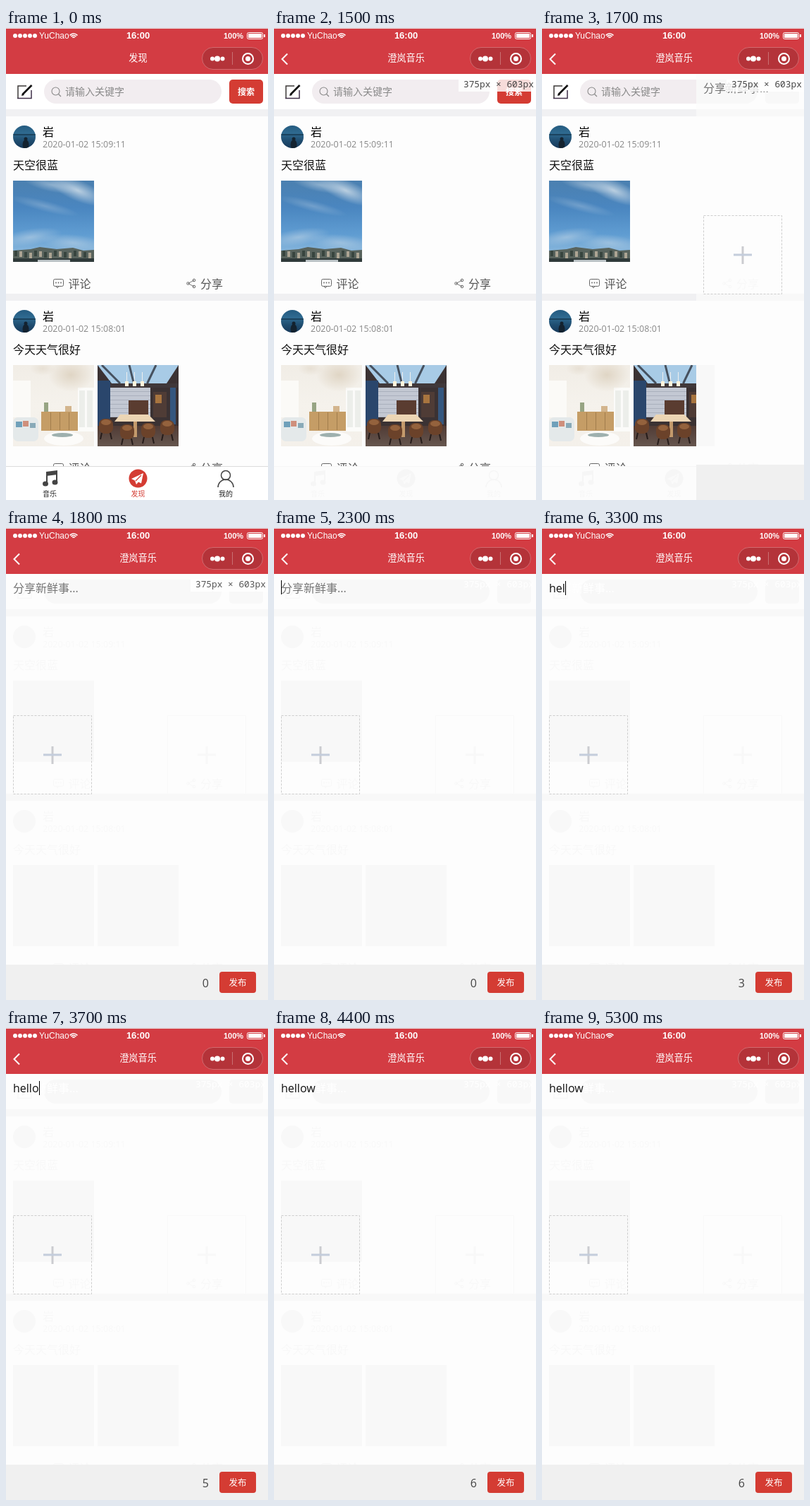
An HTML page with a canvas for the animation above (8000 ms loop, 372x668 px).

```html
<!DOCTYPE html>
<html lang="zh-CN">
<head>
<meta charset="utf-8">
<title>发现</title>
<style>
  html, body { margin: 0; width: 100%; height: 100%; overflow: hidden; background: #fdfdfd; }
  canvas { display: block; width: 372px; height: 668px; }
</style>
</head>
<body>
<canvas id="stage"></canvas>
<script>
const W = 372, H = 668, LOOP = 8000;
const RED = '#d43c33', BAR = '#d33c43', PAPER = '#fdfdfd';
const SANS = '"Open Sans", "Noto Sans CJK SC", "Noto Sans CJK", sans-serif';
const CJK = '"Noto Sans CJK SC", "Noto Sans CJK", sans-serif';
const ARIAL = '"Liberation Sans", Arial, sans-serif';
const MONO = '"Noto Sans Mono", "DejaVu Sans Mono", monospace';
const HINT = '分享新鲜事...';
const WORD = 'hellow';
const KEYS = [3000, 3100, 3300, 3500, 3700, 3900];
const CARET = [[2200, 2700], [3000, 4400], [4900, 5300]];

const canvas = document.getElementById('stage');
const ctx = canvas.getContext('2d');
const dpr = window.devicePixelRatio || 1;
canvas.width = W * dpr;
canvas.height = H * dpr;

// When set, everything is painted in this single faint tone.
let ghost = null;
const ink = c => ghost || c;

function rect(x, y, w, h, c) {
  ctx.fillStyle = ink(c);
  ctx.fillRect(x, y, w, h);
}

function round(x, y, w, h, r, c, stroke) {
  ctx.beginPath();
  ctx.roundRect(x, y, w, h, r);
  if (c) { ctx.fillStyle = ink(c); ctx.fill(); }
  if (stroke) { ctx.strokeStyle = ink(stroke); ctx.stroke(); }
}

function oval(x, y, rx, ry, c) {
  ctx.beginPath();
  ctx.ellipse(x, y, rx, ry, 0, 0, 7);
  ctx.fillStyle = ink(c);
  ctx.fill();
}
const dot = (x, y, r, c) => oval(x, y, r, r, c);

function ring(x, y, r, c, w) {
  ctx.beginPath();
  ctx.arc(x, y, r, 0, 7);
  ctx.strokeStyle = ink(c);
  ctx.lineWidth = w;
  ctx.stroke();
}

function line(pts, c, w) {
  ctx.beginPath();
  pts.forEach(([x, y]) => ctx.lineTo(x, y));
  ctx.strokeStyle = ink(c);
  ctx.lineWidth = w;
  ctx.stroke();
}

function poly(pts, c) {
  ctx.beginPath();
  pts.forEach(([x, y]) => ctx.lineTo(x, y));
  ctx.fillStyle = ink(c);
  ctx.fill();
}

// y is the optical centre of the line.
function text(s, x, y, size, c, align = 'left', family = SANS, weight = 400) {
  ctx.font = `${weight} ${size}px ${family}`;
  ctx.textAlign = align;
  ctx.fillStyle = ink(c);
  ctx.fillText(s, x, Math.round(y + size * 0.37));
}

function fade(y0, y1, ...stops) {
  const g = ctx.createLinearGradient(0, y0, 0, y1);
  stops.forEach((c, i) => g.addColorStop(i / (stops.length - 1), c));
  return g;
}

// Soft-edged elliptical haze.
function haze(x, y, rx, ry, rgb, alpha, turn = 0) {
  const g = ctx.createRadialGradient(0, 0, 0, 0, 0, 1);
  g.addColorStop(0, `rgba(${rgb},${alpha})`);
  g.addColorStop(1, `rgba(${rgb},0)`);
  ctx.save();
  ctx.translate(x, y);
  ctx.rotate(turn);
  ctx.scale(rx, ry);
  dot(0, 0, 1, g);
  ctx.restore();
}

function inside(x, y, w, h, draw) {
  ctx.save();
  ctx.beginPath();
  ctx.rect(x, y, w, h);
  ctx.clip();
  draw();
  ctx.restore();
}

function header(title, back) {
  rect(0, 0, W, 65, BAR);
  rect(0, 0, W, 1, '#e6dcdd');
  for (let i = 0; i < 5; i++) dot(13 + i * 7, 11, 3, '#fff');
  text('YuChao', 47, 10.5, 12, '#fff', 'left', ARIAL);
  for (const r of [2, 4.5, 7]) {
    ctx.beginPath();
    ctx.arc(96, 15, r, -Math.PI * 0.78, -Math.PI * 0.22);
    ctx.strokeStyle = '#fff';
    ctx.lineWidth = 1.6;
    ctx.stroke();
  }
  text('16:00', 187.5, 10.5, 13, '#fff', 'center', ARIAL, 700);
  text('100%', 309, 11, 11, '#fff', 'left', ARIAL, 700);
  ctx.lineWidth = 1;
  round(342.5, 6.5, 22, 9, 2, null, '#fff');
  rect(344, 8, 19, 6, '#fff');
  rect(366, 9, 2, 4, '#fff');

  text(title, 187.5, 42, 13.2, '#fff', 'center', CJK, 500);
  if (back) line([[19, 36.5], [11.5, 44], [19, 51.5]], '#fff', 2);

  ctx.lineWidth = 1;
  round(278.5, 27.5, 86, 31, 15.5, 'rgba(0,0,0,.15)', 'rgba(255,255,255,.25)');
  dot(293, 43.5, 3, '#fff');
  dot(300, 43.5, 4, '#fff');
  dot(307.5, 43.5, 3, '#fff');
  rect(321, 34, 1, 18, 'rgba(255,255,255,.3)');
  ring(343.5, 43.5, 7.5, '#fff', 2);
  dot(343.5, 43.5, 3.5, '#fff');
}

function searchBar() {
  if (!ghost) rect(0, 65, W, 50, '#fff');
  line([[29, 82], [17, 82], [17, 100]], '#3c3a38', 1.5);
  line([[16, 99.5], [36, 99.5], [36, 88]], '#40304a', 1.5);
  line([[24, 93.5], [36.5, 81]], '#111', 2.6);
  poly([[22, 96], [23, 92], [26, 95]], '#111');
  round(54, 73, 252, 34, 17, '#f2edf0');
  ring(70.5, 89.5, 5.5, '#8a8a8a', 1.1);
  line([[74.5, 93.5], [78, 97]], '#8a8a8a', 1.2);
  text('请输入关键字', 84, 90, 14, '#8a8a8a');
  round(317, 73, 48, 34, 5, RED);
  text('搜索', 341, 91, 12, '#fff', 'center', CJK, 700);
}

function skyPhoto() {
  rect(0, 0, 115, 115, fade(0, 115, '#4b80b0', '#4a86c0', '#609dd2', '#9fc5e2'));
  const mist = '205,220,232';
  haze(92, 14, 44, 15, mist, 0.85, 0.4);
  haze(55, 6, 40, 10, mist, 0.5, 0.2);
  haze(45, 36, 50, 8, mist, 0.3, 0.25);
  haze(25, 80, 45, 12, mist, 0.5, -0.15);
  haze(85, 88, 45, 12, mist, 0.45, 0.1);
  poly([[0, 99], [25, 97], [38, 94], [62, 97], [85, 95], [100, 99], [115, 98], [115, 115], [0, 115]], '#58635d');
  for (let i = 0; i < 16; i++) rect(2 + i * 7, 99 + i * 5 % 4, 4, 8, i % 2 ? '#aca493' : '#37443e');
  rect(0, 110, 115, 5, '#2f3a3a');
  rect(35, 112, 46, 3, '#b9c1c4');
}

function loungePhoto() {
  rect(0, 0, 115, 115, fade(0, 115, '#f1ede6', '#f5f2ec', '#f4f0ea'));
  rect(0, 22, 25, 52, '#fbfaf7');
  rect(92, 32, 23, 62, '#fbfbf9');
  rect(94, 36, 8, 52, '#eceeea');
  rect(105, 36, 8, 52, '#eceeea');
  haze(82, 14, 32, 24, '219,207,188', 0.8);
  haze(42, 5, 18, 10, '225,215,200', 0.6);
  rect(40, 66, 52, 27, '#c59d66');
  for (let x = 53; x < 92; x += 13) rect(x, 67, 1, 25, '#a17d4c');
  rect(44, 53, 6, 13, '#97a483');
  rect(74, 58, 9, 8, '#d3b58d');
  round(0, 74, 36, 34, 7, '#e4e9ea');
  rect(4, 80, 9, 8, '#6fa0ba');
  rect(14, 79, 8, 8, '#cf8f7c');
  rect(24, 82, 8, 7, '#89aab8');
  oval(72, 104, 28, 10, '#fcfbf9');
  oval(70, 99, 15, 3, '#9eb0ae');
}

function diningPhoto() {
  rect(0, 0, 115, 115, '#3b3233');
  poly([[0, 0], [115, 0], [98, 26], [20, 26]], '#a8cbe6');
  for (const x of [6, 45, 83]) line([[x, 0], [x / 2 + 29, 26]], '#46515f', 3);
  rect(0, 26, 115, 6, '#40383a');
  rect(0, 22, 18, 93, '#2a466c');
  rect(18, 32, 57, 42, '#c3c8d3');
  for (let y = 37; y < 74; y += 6) rect(18, y, 57, 1, '#aab0bd');
  rect(44, 50, 28, 22, '#5a3c30');
  rect(79, 38, 19, 36, '#4f3c36');
  rect(82, 42, 9, 12, '#a8753f');
  rect(103, 32, 8, 52, '#35577f');
  for (const x of [41, 52, 63]) {
    rect(x, 10, 1, 14, '#eee');
    rect(x - 2, 23, 5, 7, '#fff4dc');
  }
  rect(0, 86, 115, 29, fade(86, 115, '#503b35', '#66564e'));
  poly([[32, 70], [72, 70], [82, 80], [24, 80]], '#ecd5b4');
  rect(51, 80, 5, 22, '#c39a6c');
  for (const [x, y] of [[12, 76], [42, 84], [72, 82], [99, 78]]) {
    round(x - 10, y, 20, 21, 8, '#6b422a');
    oval(x, y + 5, 7, 4, '#94623d');
    line([[x - 6, y + 20], [x - 8, y + 29]], '#261c1a', 2);
    line([[x + 6, y + 20], [x + 8, y + 29]], '#261c1a', 2);
  }
}

function photo(x, y, paint) {
  if (ghost) return rect(x, y, 115, 115);
  inside(x, y, 115, 115, () => {
    ctx.translate(x, y);
    paint();
  });
}

function avatar(x, y) {
  if (ghost) return dot(x, y, 16);
  ctx.save();
  ctx.beginPath();
  ctx.arc(x, y, 16, 0, 7);
  ctx.clip();
  rect(x - 16, y - 16, 32, 32, fade(y - 16, y + 16, '#245b80', '#2f6a90', '#1f4d70', '#17395a'));
  rect(x - 16, y - 4, 32, 2, '#1b435e');
  dot(x + 2, y + 3, 2.5, '#13222f');
  oval(x + 2, y + 11, 4.5, 7, '#13222f');
  ctx.restore();
}

function post(y, date, words, photos) {
  avatar(26, y + 29);
  text('岩', 52, y + 22, 16, '#000');
  text(date, 52, y + 39.5, 12.5, '#888');
  text(words, 10, y + 69, 16, '#111');
  photos.forEach((p, i) => photo(10 + i * 120, y + 91, p));

  ctx.lineWidth = 1;
  round(67.5, y + 230.5, 14, 10, 2, null, '#666');
  line([[71, y + 240.5], [73, y + 243], [75, y + 240.5]], '#666', 1);
  for (const x of [71, 74.5, 78]) dot(x, y + 235.5, 0.9, '#666');
  text('评论', 88.5, y + 237, 16, '#555');

  line([[267, y + 232], [258.5, y + 236.5], [267, y + 241]], '#666', 0.9);
  ring(267, y + 232, 1.8, '#666', 1);
  ring(258.5, y + 236.5, 1.8, '#666', 1);
  ring(267, y + 241, 1.8, '#666', 1);
  text('分享', 276, y + 237, 16, '#555');
}

function feed() {
  searchBar();
  rect(0, 115, W, 10, '#f1f1f3');
  post(125, '2020-01-02 15:09:11', '天空很蓝', [skyPhoto]);
  rect(0, 376, W, 10, '#f0f0f2');
  post(386, '2020-01-02 15:08:01', '今天天气很好', [loungePhoto, diningPhoto]);
}

function tabs() {
  ctx.fillStyle = ghost ? '#fcfcfc' : '#fff';
  ctx.fillRect(0, 620, W, 48);
  rect(0, 620, W, 1, '#dcdcdc');

  const dark = '#444';
  poly([[57, 628], [73, 626], [73, 632], [57, 634]], dark);
  rect(57, 629, 2, 16, dark);
  rect(71, 627, 2, 16, dark);
  oval(56, 645, 4, 3.5, dark);
  oval(69.5, 643, 4, 3.5, dark);

  dot(187.5, 637.5, 13, RED);
  ctx.fillStyle = ghost ? '#fafafa' : '#fff';
  ctx.beginPath();
  [[195, 630], [178, 638], [183, 640.5], [185, 646], [188, 642.5], [192, 644.5]].forEach(p => ctx.lineTo(...p));
  ctx.fill();
  line([[184, 641], [192, 633]], RED, 1.2);

  ring(312, 633, 6.5, dark, 1.5);
  ctx.beginPath();
  ctx.arc(312, 650, 11, Math.PI, 0);
  ctx.stroke();

  text('音乐', 62, 659, 10, '#222', 'center');
  text('发现', 187.5, 659, 10, RED, 'center');
  text('我的', 312, 659, 10, '#222', 'center');
}

function addBox(x, dashed) {
  ctx.lineWidth = 1;
  ctx.setLineDash(dashed ? [3, 2] : []);
  round(x + 0.5, 265.5, 111, 111, 0, null, '#cdcdcd');
  ctx.setLineDash([]);
  rect(x + 54.5, 309, 3, 25, '#cbccd0');
  rect(x + 43, 319.5, 26, 3, '#c4cddc');
}

function withGhost(tone, draw) {
  ghost = tone;
  draw();
  ghost = null;
}

function sizeLabel(c, plate) {
  if (plate) rect(262, 72, 110, 18, 'rgba(255,255,255,.82)');
  text('375px × 603px', 269, 79, 12.8, c, 'left', MONO);
}

function footer() {
  rect(0, 618, W, 50, '#f0f0f0');
}

function slideIn() {
  inside(219, 65, W - 219, H - 65, () => {
    rect(219, 65, W, H, PAPER);
    withGhost('#f8f8f8', feed);
    ctx.translate(219, 0);
    text(HINT, 10, 85, 16, '#757575');
    addBox(10, true);
    footer();
  });
}

function editor(t) {
  rect(0, 65, W, H, PAPER);
  withGhost('#f8f8f8', () => {
    feed();
    addBox(229, false);
  });
  addBox(10, true);
  footer();

  const n = KEYS.filter(k => t >= k).length;
  const typed = WORD.slice(0, n);
  const fresh = n === 1;
  ctx.font = `16px ${SANS}`;
  const caretX = n ? Math.floor(11 + ctx.measureText(typed).width) : 10;

  if (n) {
    inside(caretX + 1, 65, W, 50, () => text(HINT, 10, 85, 16, '#fff'));
    text(typed, 10, 85, 16, fresh ? '#1c2c78' : '#111');
  } else {
    text(HINT, 10, 85, 16, '#757575');
  }
  if (CARET.some(([a, b]) => t >= a && t < b)) rect(caretX, n ? 75 : 74, 1, 20, '#000');

  if (t < 2300) sizeLabel('#555', true);
  else sizeLabel('#fff', false);

  text(String(n), 288, 644, 16, fresh ? '#3b4a9c' : '#444', 'right');
  round(303, 628, 52, 30, 4, RED);
  text('发布', 329, 643.5, 12.5, '#fff', 'center');
}

function draw(t) {
  ctx.setTransform(dpr, 0, 0, dpr, 0, 0);
  rect(0, 0, W, H, PAPER);
  if (t >= 1800) {
    editor(t);
  } else {
    feed();
    if (t < 1500) {
      tabs();
    } else {
      withGhost('#f6f6f6', tabs);
      if (t >= 1700) slideIn();
      sizeLabel('#444', true);
    }
  }
  header(t < 1500 ? '发现' : '澄岚音乐', t >= 1500);
}

const start = performance.now();
function tick() {
  draw((performance.now() - start) % LOOP);
  requestAnimationFrame(tick);
}
tick();
</script>
</body>
</html>
```
